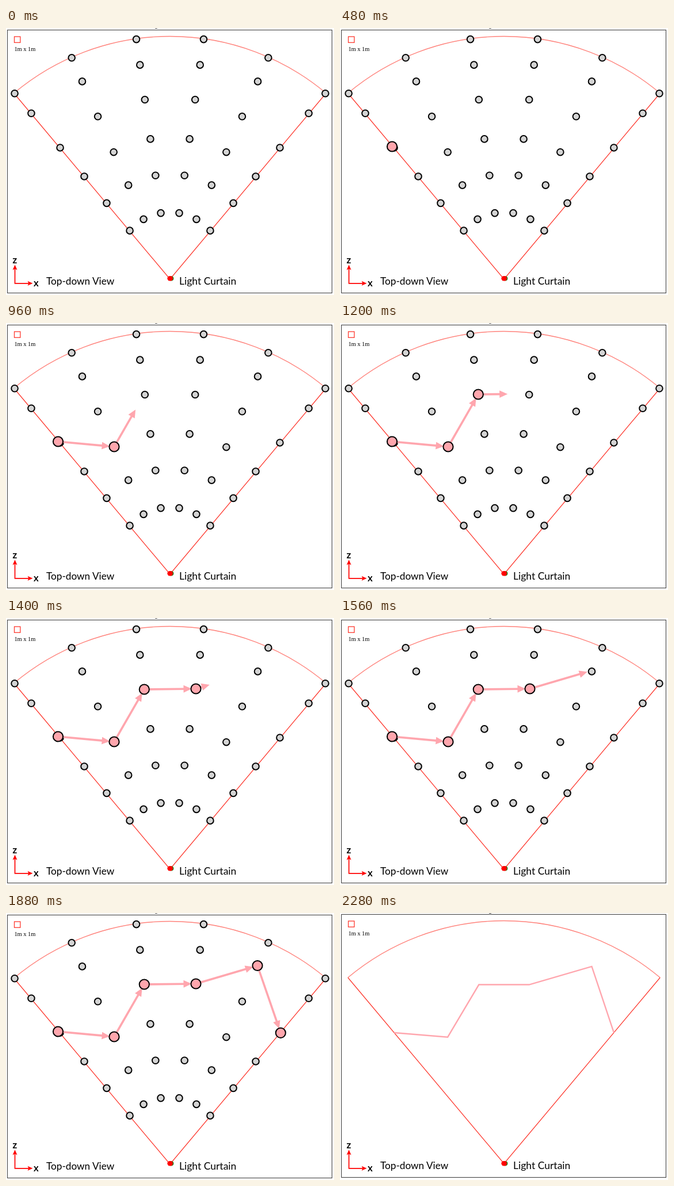
An HTML page for the animation above (2.76 s loop, 570 by 464 pixels).

```html
<!DOCTYPE html>
<html lang="en">
<head>
<meta charset="utf-8">
<title>Light curtain path</title>
<style>
  html, body { margin: 0; width: 100%; height: 100%; overflow: hidden; background: #fff; }
  svg { display: block; width: 570px; height: 464px; }
  .line { fill: none; stroke: #fd3a30; stroke-width: 1.3; }
  .arc { fill: none; stroke: #ff827b; stroke-width: 1.3; }
  .spot { fill: #d4d4d4; stroke: #000; stroke-width: 2; }
  .node { fill: #ffa6ad; stroke: #000; stroke-width: 2; }
  .shaft { stroke: #ffa6ae; stroke-width: 3.6; }
  .head { fill: #ffa6ae; }
  .curtain { fill: none; stroke: #ffa6ae; stroke-width: 2.4; }
  .axis { fill: none; stroke: #f00; stroke-width: 1.7; }
  .label { font: 17.2px Lato, "Open Sans", sans-serif; }
  .bold { font: bold 13px "Open Sans", "Noto Sans", sans-serif; }
  .tiny { font: 10.4px "Liberation Serif", "Noto Serif", serif; }
</style>
</head>
<body>
<svg viewBox="0 0 570 464">
  <rect x="259" y="0" width="4" height="1" fill="#555"/>
  <g id="scene">
    <rect x="2.5" y="2.5" width="564" height="457" fill="none" stroke="#444" stroke-width="1.1"/>
    <rect class="line" x="14.5" y="14" width="10.3" height="10.3"/>
    <text class="tiny" x="14.4" y="39">1m x 1m</text>
    <text class="label" x="70" y="445">Top-down View</text>
    <text class="label" x="301" y="445" style="font-size: 17.5px">Light Curtain</text>
    <g id="fan"></g>
  </g>
  <path class="axis" d="M15.5 416V443.8H42"/>
  <path fill="#f00" d="M15.5 411.5l4 9-4-2-4 2zM46.5 443.8l-9 4 2-4-2-4z"/>
  <text class="bold" x="11.5" y="409">Z</text>
  <text class="bold" x="48" y="449">X</text>
  <g id="plan">
    <g id="spots"></g>
    <g id="arrows"></g>
    <g id="nodes"></g>
  </g>
  <g id="result"></g>
  <circle cx="287.3" cy="435.3" r="4.1" fill="#1c8a1c"/>
  <rect x="280.4" y="431" width="9.6" height="8.4" rx="4.2" fill="#f00"/>
</svg>
<script>
const LOOP = 2760, TICK = 40, RESULT_AT = 2280;
const APEX = { x: 285, y: 435.5 }, REACH = 422;
const HEAD = 14, GAP = 7.5;
const $ = id => document.getElementById(id);

function add(parent, tag, attrs = {}) {
  const el = document.createElementNS("http://www.w3.org/2000/svg", tag);
  for (const k in attrs) el.setAttribute(k, attrs[k]);
  return parent.appendChild(el);
}

function show(el, on) {
  el.style.display = on ? "" : "none";
}

// point at a distance from the apex, angle in degrees from straight up
function polar(r, deg) {
  const a = deg * Math.PI / 180;
  return [APEX.x + r * Math.sin(a), APEX.y - r * Math.cos(a)];
}

const left = polar(REACH, -40), right = polar(REACH, 40);
add($("fan"), "path", { class: "arc", d: `M${left}A${REACH} ${REACH} 0 0 1 ${right}` });
add($("fan"), "path", { class: "line", d: `M${left}L${APEX.x} ${APEX.y}L${right}` });

// six rays 16 degrees apart; the inner rows flatten towards the sides
const rows = [420, 375, 314, 245, 181, 115];

function spot(ray, row) {
  const side = Math.abs(ray - 2.5) - 0.5;
  const squash = row < 2 ? 0 : 0.009 * side * (side + 1);
  return polar(rows[row] * (1 - squash), (ray - 2.5) * 16);
}

for (let ray = 0; ray < 6; ray++)
  for (let row = 0; row < rows.length; row++) {
    const [cx, cy] = spot(ray, row);
    add($("spots"), "circle", { class: "spot", cx, cy, r: 5.8 });
  }

// chosen row on each ray
const picks = [2, 3, 2, 2, 1, 2];
add($("result"), "polyline", {
  class: "curtain",
  points: picks.map((row, ray) => spot(ray, row)).join(" ")
});

// x, y, time of appearance
const nodes = [
  [90.5, 206, 480], [188, 215, 800], [240.3, 124, 1040],
  [330, 123, 1320], [437, 91.5, 1600], [477.3, 208.3, 1880]
].map(([x, y, at]) => ({
  x, y, at,
  el: add($("nodes"), "circle", { class: "node", cx: x, cy: y, r: 8.6 })
}));

const arrows = nodes.slice(1).map((to, i) => {
  const from = nodes[i], dx = to.x - from.x, dy = to.y - from.y;
  const turn = Math.atan2(dy, dx) * 180 / Math.PI;
  const el = add($("arrows"), "g", { transform: `translate(${from.x} ${from.y}) rotate(${turn})` });
  return {
    el,
    start: from.at + 30,
    end: to.at - TICK,
    length: Math.hypot(dx, dy) - GAP,
    shaft: add(el, "line", { class: "shaft" }),
    head: add(el, "path", { class: "head", d: `M0 0L${-HEAD} -6.4V6.4Z` })
  };
});

function grow(arrow, t) {
  const p = Math.min(1, (t - arrow.start) / (arrow.end - arrow.start));
  show(arrow.el, p > 0);
  if (p <= 0) return;
  const d = arrow.length * p;
  arrow.shaft.setAttribute("x2", Math.max(0, d - HEAD + 1));
  arrow.head.setAttribute("transform", `translate(${d} 0) scale(${Math.min(1, d / HEAD)})`);
}

function draw(now) {
  const t = Math.floor((now % LOOP) / TICK) * TICK;
  const done = t >= RESULT_AT;
  show($("plan"), !done);
  show($("result"), done);
  $("scene").setAttribute("transform", `translate(0 ${done ? 0 : 1})`);
  nodes.forEach(n => show(n.el, t >= n.at));
  arrows.forEach(a => grow(a, t));
}

const begin = performance.now();
function loop() {
  draw(performance.now() - begin);
  requestAnimationFrame(loop);
}
loop();
</script>
</body>
</html>
```
